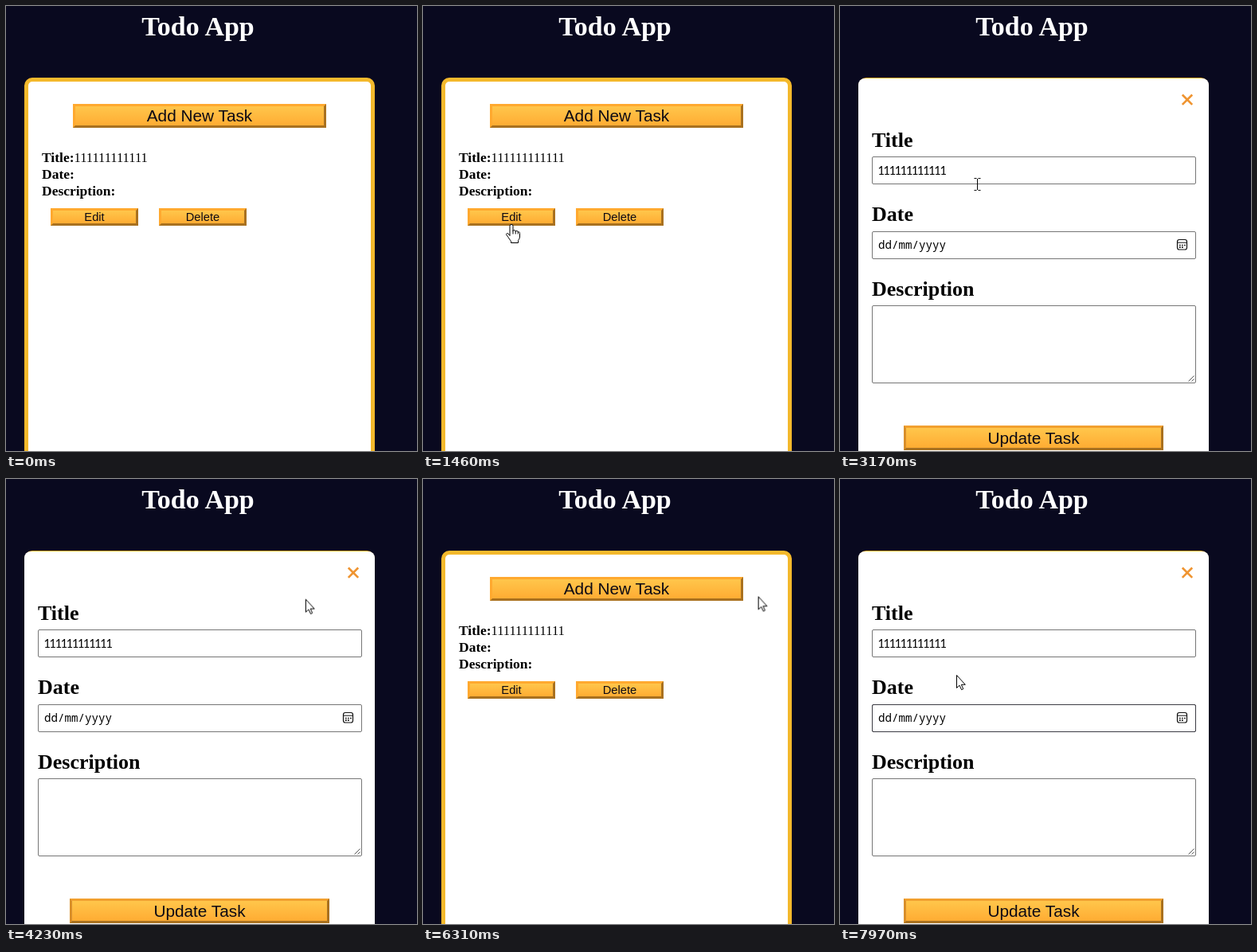
These frames come from a looping animation (516 px wide and 559 px high, 7.99 s). An HTML page:

```html
<!DOCTYPE html>
<html lang="en">
<head>
<meta charset="utf-8">
<title>Todo App</title>
<style>
html, body { margin: 0; width: 100%; height: 100%; overflow: hidden; background: #09091f; }
.stage { position: relative; width: 516px; height: 559px; overflow: hidden; background: #09091f; }
.stage div, svg { position: absolute; }
svg { left: 0; top: 0; width: 516px; height: 559px; overflow: visible; }
text { font-family: "Liberation Serif", "Times New Roman", serif; }
.b { font-weight: bold; }
.item { font-size: 17.5px; }
.value { font-size: 16.5px; }
.label { font-size: 26px; font-weight: bold; }

.panel { left: 23px; top: 90px; width: 430px; height: 500px; border: 5px solid #f4b92c; border-radius: 10px; background: #fff; }
.form { inset: 0; }
.sheet { left: 23px; top: 91px; width: 440px; height: 500px; border-radius: 8px; background: #fff; }

.btn {
  box-sizing: border-box; display: flex; align-items: center; justify-content: center; isolation: isolate;
  border: 3px solid; border-color: #ffa92f #a9711f #a9711f #ffa92f;
  background: linear-gradient(#ffc64b, #ffac33);
  font: 20.8px "Liberation Sans", Arial, sans-serif; color: #0c0a14; white-space: nowrap;
}
.small { top: 254px; width: 110px; height: 22px; font-size: 14.7px; }
.btn::before { content: ""; position: absolute; inset: 0; z-index: -1; background: linear-gradient(#ffb733, #ff9b0c); opacity: 0; }
.add { left: 84px; top: 123px; width: 318px; height: 30px; }
.edit { left: 56px; }
.delete { left: 192px; }
.update { left: 80px; top: 527px; width: 326px; height: 31px; border-color: #f2a02f #a9711f #a9711f #d98f2a; }

.field { box-sizing: border-box; left: 40px; width: 407px; height: 35px; border: 1px solid #767676; border-radius: 2px; }
.field::after { content: ""; position: absolute; inset: -1px; border: 1px solid #3c3c44; border-radius: 2px; opacity: 0; }

/* One 7990 ms loop drives everything */
.form, .btn::before, .field::after, .arrow, .hand, .beam, .click { animation: 7990ms step-end infinite; }
.form { animation-name: form; }
.edit::before { animation-name: edit; }
.delete::before { animation-name: delete; }
.name::after { animation-name: name; }
.date::after { animation-name: date; }
.arrow { animation-name: arrow; }
.hand { animation-name: hand; }
.beam { animation-name: beam; }
.click { animation-name: click; }
.cursor { left: 0; top: 0; width: 0; height: 0; animation: move 7990ms linear infinite; }

@keyframes form { 0%, 67.58% { opacity: 0 } 21.28%, 96.12%, 100% { opacity: 1 } }
@keyframes edit { 0%, 21.28%, 96.12%, 100% { opacity: 0 } 19.52%, 88% { opacity: 1 } }
@keyframes delete { 0%, 87.1%, 100% { opacity: 0 } 84.9% { opacity: 1 } }
@keyframes name { 0%, 52.4%, 100% { opacity: 0 } 40.93% { opacity: 1 } }
@keyframes date { 0%, 34.5%, 67.58% { opacity: 0 } 21.28%, 96.12%, 100% { opacity: 1 } }
@keyframes arrow {
  0%, 17.52%, 39.1%, 59.3%, 84.9%, 88% { opacity: 0 }
  2.25%, 21.28%, 50.2%, 67.58%, 87.1%, 96.12%, 100% { opacity: 1 }
}
@keyframes hand {
  0%, 21.28%, 67.58%, 87.1%, 96.12%, 100% { opacity: 0 }
  17.52%, 59.3%, 84.9%, 88% { opacity: 1 }
}
@keyframes beam { 0%, 50.2%, 100% { opacity: 0 } 39.1% { opacity: 1 } }
@keyframes click { 0%, 21.28%, 67.58%, 96.12%, 100% { opacity: 0 } 19.52%, 65.58%, 94.36% { opacity: 1 } }
@keyframes move {
  0%, 2.25% { transform: translate(484px, 552px); animation-timing-function: cubic-bezier(.3, .3, .6, .85) }
  12.02% { transform: translate(161px, 311px); animation-timing-function: ease-out }
  15.64%, 17.4% { transform: translate(110px, 285px) }
  17.9%, 25.1% { transform: translate(110px, 274px) }
  27.03%, 30.04% { transform: translate(107px, 272px); animation-timing-function: ease-in-out }
  39.6%, 40.93% { transform: translate(172px, 224px) }
  42.8%, 46.43% { transform: translate(176px, 219px); animation-timing-function: ease-in-out }
  55.19%, 56.45% { transform: translate(407px, 140px); animation-timing-function: ease-in-out }
  60.95%, 73.47% { transform: translate(435px, 119px); animation-timing-function: ease-in }
  78.97% { transform: translate(421px, 147px) }
  83.35% { transform: translate(315px, 237px) }
  84.9% { transform: translate(296px, 255px); animation-timing-function: ease-out }
  89.86%, 96.12% { transform: translate(146px, 267px); animation-timing-function: ease-in-out }
  99.6%, 100% { transform: translate(146px, 246px) }
}
</style>
</head>
<body>
<div class="stage">
  <div class="panel"></div>
  <svg>
    <text class="b" x="170.3" y="37" font-size="34" fill="#fff">Todo App</text>
    <text class="item b" x="45" y="196">Title:<tspan class="value" font-weight="normal">111111111111</tspan></text>
    <text class="item b" x="45" y="217">Date:</text>
    <text class="item b" x="45" y="238">Description:</text>
  </svg>
  <div class="btn add">Add New Task</div>
  <div class="btn small edit">Edit</div>
  <div class="btn small delete">Delete</div>

  <div class="form">
    <div class="sheet"></div>
    <div class="field name" style="top:189px"></div>
    <div class="field date" style="top:283px"></div>
    <div class="field" style="top:376px;height:98px"></div>
    <svg>
      <path d="M429.8 111.5l12.4 12.4m0-12.4l-12.4 12.4" stroke="#ef9430" stroke-width="2.6"/>
      <text class="label" x="40" y="177">Title</text>
      <text class="label" x="40" y="270">Date</text>
      <text class="label" x="40" y="364">Description</text>
      <text x="47.5" y="212" style="font:14.5px Lato,sans-serif;letter-spacing:-1.33px">111111111111</text>
      <text x="48" y="305" style="font:14.2px 'Noto Sans Mono',monospace">dd/mm/yyyy</text>
      <g fill="none" stroke="#111">
        <rect x="423.5" y="293.5" width="12" height="12.5" rx="2.5" stroke-width="1.2"/>
        <path d="M424 297.2h11"/>
        <path d="M426 300.5h8M426 303.2h5.5" stroke-width="1.7" stroke-dasharray="1.7 1.3"/>
        <path d="M437.5 471.5l7-7m-3 7l3-3" stroke="#555"/>
      </g>
    </svg>
    <div class="btn update">Update Task</div>
  </div>

  <div class="cursor">
    <svg stroke="#000" fill="#fff" stroke-linejoin="round">
      <circle class="click" r="12" fill="#ff0" fill-opacity=".55" stroke="none"/>
      <path class="arrow" d="M.5 .5V16.5L4 13.2L6.6 18.7L8.8 17.7L6.3 12.3H11.3Z"/>
      <g class="hand">
        <path d="M-1 14.5V2.2Q-1 .5 1 .5T3 2.2V8.5Q3.3 7.5 4.7 7.6T6.2 9.2Q6.5 8.3 7.9 8.5T9.3 10.3Q9.8 9.6 10.6 9.8T11.5 11.5V16Q11.5 18 9.5 20.5V23.5H.5V21.5Q-1.5 19-3 16.5L-5.2 13.5Q-5.8 12-4.5 11.5Q-3 11.3-1 14.5Z"/>
        <path d="M3 8v4.5M6.2 9v3.5M9.3 10v2.5" fill="none"/>
      </g>
      <path class="beam" d="M-3.5-7.5H-.5M1.5-7.5H4.5M-3.5 7.5H-.5M1.5 7.5H4.5M.5-7V7" fill="none"/>
    </svg>
  </div>
</div>
</body>
</html>
```
